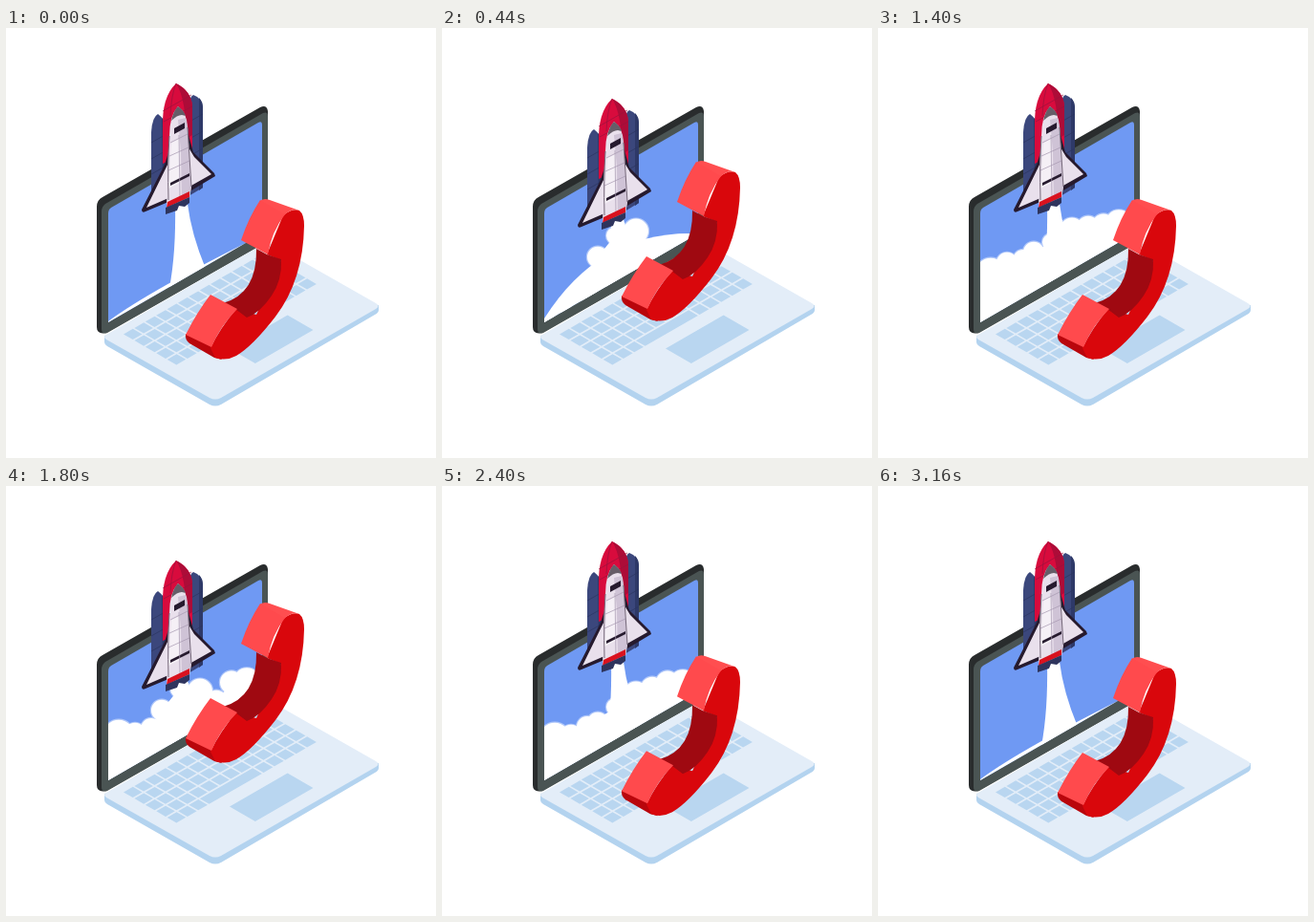
Write an HTML page with a canvas that moves like this. It is 450 px wide and 450 px high and loops after 3.24 s.

```html
<!DOCTYPE html>
<html lang="en">
<head>
<meta charset="utf-8">
<title>Launch call</title>
<style>
html, body { margin: 0; width: 100%; height: 100%; overflow: hidden; background: #fff; }
canvas { display: block; width: 450px; height: 450px; }
</style>
</head>
<body>
<canvas id="stage" width="450" height="450"></canvas>
<script>
const ctx = document.getElementById('stage').getContext('2d');
const LOOP = 3240, STEP = 40, HOP = 1620;

// [ms, offset] for the phone's jump and the shuttle's dip
const JUMP = [[0, 0], [90, 23], [180, 57], [250, 64], [320, 60], [440, 40],
  [560, 14], [660, 4], [760, 2], [900, 0], [HOP, 0]];
const DIP = [[0, 0], [90, 8], [180, 20], [280, 24], [440, 16], [540, 6], [640, 0], [HOP, 0]];
const HILL = [[0, 0], [440, 1], [2400, 1], [3160, 0], [LOOP, 0]];

// Puffs: x and radius, then their heights above the screen's lower edge
const PUFFS = [[118, 16], [135, 11], [152, 11], [163, 11], [181, 9], [203, 13],
  [220, 12], [236, 12], [252, 14]];
const gone = PUFFS.map(() => -4);
const HEIGHTS = [
  [0, gone],
  [440, [0, 0, 18, 47, 57, 53, 21, 15, 8]],
  [760, [60, 55, 52, 50, 68, 52, 46, 38, 32]],
  [1400, [61, 57, 50, 52, 50, 54, 46, 39, 34]],
  [1800, [57, 44, 39, 52, 62, 51, 29, 40, 34]],
  [2400, [54, 42, 41, 39, 43, 48, 43, 40, 32]],
  [2800, [28, 20, 20, 18, 20, 20, 22, 24, 18]],
  [3160, gone],
  [LOOP, gone]
];

function segment(keys, t) {
  let i = 0;
  while (i < keys.length - 2 && t >= keys[i + 1][0]) i++;
  return [i, (t - keys[i][0]) / (keys[i + 1][0] - keys[i][0])];
}
const mix = (a, b, u) => a + (b - a) * u;

function linear(keys, t) {
  const [i, u] = segment(keys, t);
  return mix(keys[i][1], keys[i + 1][1], u);
}

// Cubic curve through the keys, level at peaks and at the ends
function smooth(keys, t) {
  const [i, u] = segment(keys, t);
  const slope = k => {
    if (k < 1 || k > keys.length - 2) return 0;
    const [a, b, c] = keys.slice(k - 1, k + 2);
    return (b[1] - a[1]) * (c[1] - b[1]) <= 0 ? 0 : (c[1] - a[1]) / (c[0] - a[0]);
  };
  const [a, b] = [keys[i], keys[i + 1]], d = b[0] - a[0], s = u * u * (3 - 2 * u);
  return mix(a[1], b[1], s) + d * u * (1 - u) * ((1 - u) * slope(i) - u * slope(i + 1));
}

function fill(color, d) {
  ctx.fillStyle = color;
  ctx.fill(new Path2D(d));
}
function line(color, width, d) {
  ctx.strokeStyle = color;
  ctx.lineWidth = width;
  ctx.stroke(new Path2D(d));
}
function shifted(dy, draw) {
  ctx.save();
  ctx.translate(0, dy);
  draw();
  ctx.restore();
}
// Draw on the laptop's deck plane
function onDeck(x, y, draw) {
  ctx.save();
  ctx.transform(.866, -.5, .866, .5, x, y);
  draw();
  ctx.restore();
}

function laptop() {
  fill('#b3d3ef', 'M103 322V329Q103 331 106 333L213 394Q219 397 225 394L386 300Q390 298 390 295V290Z');
  fill('#e3edf8', 'M105 321L269 226Q273 223 278 226L387 288Q392 291 387 294L225 387Q219 390 213 387L105 326Q101 323 105 321Z');
  ctx.fillStyle = '#b9d6f0';
  onDeck(123, 320.5, () => {
    for (let row = 0; row < 5; row++)
      for (let col = 0; col < 13; col++) {
        const space = row === 4 && col === 3;
        ctx.fillRect(col * 13.15, row * 13.2, space ? 63.8 : 11.3, 11.2);
        if (space) col += 4;
      }
  });
  onDeck(234, 335.5, () => ctx.fillRect(0, 0, 70, 31));
  fill('#292c2d', 'M95 187Q95 180 101 177L266 83Q273 80 274 87V223L105 319Q95 321 95 313Z');
  fill('#4a5453', 'M100 192Q100 187 104 184L269 89Q274 87 274 92V223L106 319Q100 321 100 315Z');
}

function clouds(t, dip) {
  const [i, u] = segment(HEIGHTS, t);
  const puffs = PUFFS.map(([x, r], n) => {
    const h = mix(HEIGHTS[i][1][n], HEIGHTS[i + 1][1][n], u);
    return [x, 308 - (x - 107) * .577 - h + r, r];
  });
  const circles = extra => {
    ctx.beginPath();
    for (const [x, y, r] of puffs) {
      ctx.moveTo(x + r, y);
      ctx.arc(x, y, r + extra, 0, 7);
    }
    ctx.fill();
  };
  const k = linear(HILL, t);
  fill('#fff', `M107 ${mix(307, 304, k)}Q${mix(150, 165, k)} ${mix(275, 212, k)} 265 ${mix(218, 215, k)}V320H107Z`);
  fill('#fff', `M177 ${184 + dip}Q178 235 171 272L209 252Q194 216 190 ${184 + dip}Z`);
  ctx.fillStyle = 'rgba(255,255,255,.45)';
  circles(1.2);
  ctx.fillStyle = '#fff';
  circles(0);
  fill('#fff', `M100 ${puffs[0][1]}${puffs.map(([x, y]) => `L${x} ${y}`).join('')}L275 ${puffs[8][1]}V340H100Z`);
}

function screen(t, dip) {
  ctx.save();
  ctx.clip(new Path2D('M107 194Q107 190 110 188L264 99Q268 97 268 101V215L107 308Z'));
  ctx.fillStyle = '#6f99f3';
  ctx.fillRect(100, 90, 180, 225);
  clouds(t, dip);
  ctx.restore();
}

function shuttle() {
  const ink = '#261a2e', white = '#e9e0ec';
  // boosters and tank
  fill('#3b477c', 'M152 109Q153 93 159 90Q167 96 169 106V182L152 184Z');
  fill('#3b477c', 'M191 82Q192 72 196 70Q205 73 206 83V167L191 176Z');
  fill('#2e3968', 'M163 94Q168 99 169 106V182L164 183ZM202 73Q206 77 206 83V167L202 170Z');
  line('#2b3561', .7, 'M152 120L168 111M152 137L168 128M152 153L168 144M192 98L206 90M192 116L206 108M192 134L206 126');
  fill('#d80b3d', 'M164 104Q163 72 178 58Q194 66 195 82V128L164 142Z');
  fill('#ad0c38', 'M178 58Q194 66 195 82V112L188 116Q189 75 178 58Z');
  line('#98143d', .7, 'M164 87L194 70M165 98L195 82M178 58Q173 70 172 92');
  // wings
  fill(ink, 'M173 121L166 143L142 190Q142 194 146 192L170 182L194 170L219 155Q219 152 216 150L196 130L189 105Z');
  fill(white, 'M171 139L147 188L170 178ZM191 125L197 135L215 153L192 166Z');
  // body
  fill(white, 'M171 113Q171 92 180 82Q189 88 190 104L194 166L192 178L168 189L169 145Z');
  fill('#cfc3d6', 'M180 96L188 94L190 104L194 166L192 178L184 182L183 130Z');
  fill('#f5f0f6', 'M173 120L181 116L182 162L170 168Z');
  fill('#665d68', 'M173 97Q175 87 180 82Q186 86 188 92L184 91Q179 91 173 97Z');
  fill(ink, 'M176 105L187 99V105L176 111Z');
  fill(ink, 'M172 162L192 152V155L172 165Z');
  line('#a597af', .7, 'M172 120L190 111M171 134L191 125M170 149L192 139M181 112L182 180');
  line('#756879', 1, 'M171 113Q169 142 170 180M190 104L194 166');
  fill('#d9121f', 'M169 182L192 171V177L168 188Z');
  fill('#2e345d', 'M167 188L192 177V183L187 187L181 186L179 191L167 195Z');
}

function phone() {
  fill('#b9060c', 'M188 320L215 332L226 347L218 345L192 330Q187 326 188 320Z');
  fill('#d9070c', 'M290 196Q300 188 307 191Q312 195 312 207Q311 264 282 302Q258 333 241 343Q230 349 219 345L214 335Q224 314 241 294L262 300L288 243L273 237Z');
  fill('#9f0911', 'M262 231L273 237L288 242Q289 264 278 280Q266 298 252 303L240 294L227 288Q263 278 262 231Z');
  fill('#ff4e50', 'M265 182Q269 177 276 180L307 191Q299 188 291 196Z');
  fill('#ff4a4d', 'M246 222Q254 198 266 180L292 195Q278 213 274 237Z');
  fill('#ff4a4d', 'M188 321Q200 297 214 279L242 294Q224 312 215 334Z');
}

function frame(now) {
  const t = Math.min(Math.floor(now % LOOP / STEP) * STEP, LOOP - 2 * STEP);
  const dip = smooth(DIP, t % HOP);
  ctx.fillStyle = '#fff';
  ctx.fillRect(0, 0, 450, 450);
  laptop();
  screen(t, dip);
  shifted(dip, shuttle);
  shifted(-smooth(JUMP, t % HOP), phone);
}

const start = performance.now();
function tick() {
  frame(performance.now() - start);
  requestAnimationFrame(tick);
}
tick();
</script>
</body>
</html>
```
